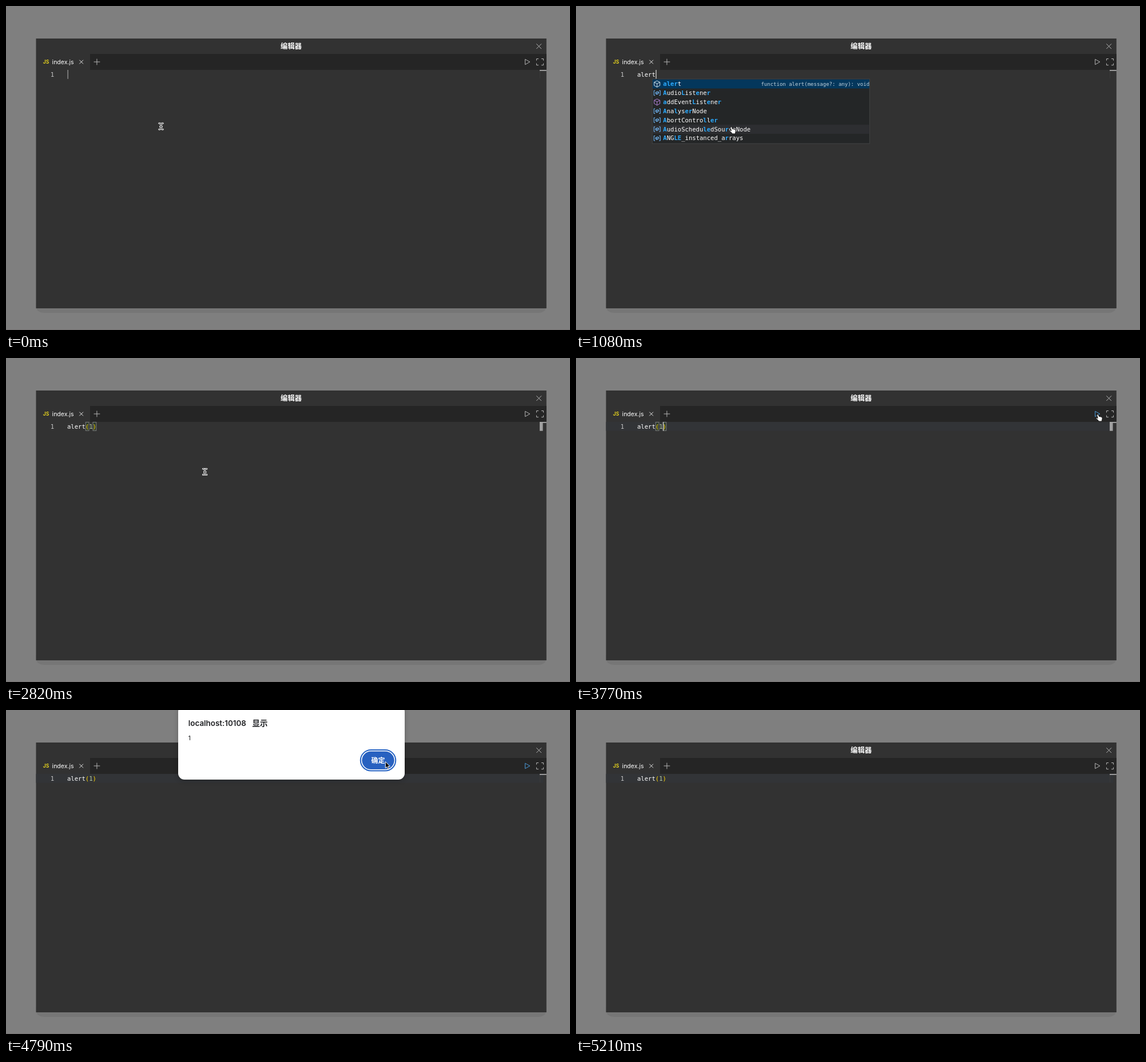
An HTML page that plays this animation: 986 by 568 pixels, repeating every 6.02 s.

```html
<!DOCTYPE html>
<html lang="zh">
<head>
<meta charset="utf-8">
<title>编辑器</title>
<style>
  html, body { margin: 0; width: 100%; height: 100%; overflow: hidden; background: #7f7f7f; }
  svg { position: absolute; left: 0; top: 0; display: block; }
  text { font-family: Inter, "Noto Sans CJK SC", "Noto Sans CJK", sans-serif; }
  .mono { font-family: "DejaVu Sans Mono", monospace; font-size: 10.58px; white-space: pre; }
  .line { fill: none; stroke: #b4b4b4; stroke-width: 1; }
  #dialog {
    position: absolute; left: 301px; top: -8px; width: 395.5px; height: 130px;
    border-radius: 11px; background: #fff; box-shadow: 0 2px 9px rgba(0, 0, 0, .24);
    transform-origin: 50% 100%;
  }
</style>
</head>
<body>
<svg width="986" height="568" viewBox="0 0 986 568">
  <defs>
    <g id="cube" fill="none" stroke-width="1">
      <path d="M6 .8 11 3.2V9L6 11.8 1 9V3.2ZM1 3.2 6 5.8 11 3.2M6 5.8V11.8"/>
    </g>
    <g id="variable" fill="none" stroke="#75beff" stroke-width="1">
      <path d="M2.6 2H.6V10.4H2.6M9.6 2H11.6V10.4H9.6M6.6 3.6 9 4.7V7L5.7 8.7 3.4 7.5V5.2ZM3.4 5.2 5.7 6.3 9 4.7M5.7 6.3V8.7"/>
    </g>
    <g id="braces" fill="none" stroke="#c5c5c5" stroke-width="1">
      <path d="M4 1.5Q2.3 1.5 2.3 3.2V4.6Q2.3 6.2 .8 6.2Q2.3 6.2 2.3 7.8V9.2Q2.3 10.9 4 10.9M8 1.5Q9.7 1.5 9.7 3.2V4.6Q9.7 6.2 11.2 6.2Q9.7 6.2 9.7 7.8V9.2Q9.7 10.9 8 10.9"/>
    </g>
  </defs>

  <rect y="567" width="986" height="1" fill="#777575"/>
  <path d="M52 520H945V524Q945 538 929 538H68Q52 538 52 524Z" fill="#767676"/>
  <rect x="52.5" y="57" width="892.3" height="473" fill="#323232"/>
  <rect x="147" y="84" width="797.8" height="28" fill="#252525"/>

  <text x="498.6" y="75.2" font-size="12.35" font-weight="600" fill="#fff" text-anchor="middle">编辑器</text>
  <path class="line" d="M927.3 66.3 936 75M936 66.3 927.3 75"/>
  <text x="64.7" y="101.3" font-size="8.6" font-weight="600" fill="#f1dd1c">JS</text>
  <text x="80.6" y="101.6" font-size="10.5" fill="#fff">index.js</text>
  <path class="line" d="M128.3 94.7 135 101.4M135 94.7 128.3 101.4" style="stroke:#e4e4e4"/>
  <path class="line" d="M153.5 98H164.3M158.9 92.6V103.4"/>
  <path id="play" class="line" d="M907.6 93.4 915.8 98 907.6 102.7Z"/>
  <path class="line" d="M927.5 95.7V92.5H931M936 92.5H939.5V95.7M939.5 100.5V103.7H936M931 103.7H927.5V100.5"/>

  <rect id="lineGlow" x="52.5" y="112" width="887" height="15.6" fill="#323437"/>
  <path d="M933.5 113V127" stroke="#3a3a3a"/>
  <rect id="rulerMark" x="933" y="112" width="5.5" height="15.8" fill="#a0a0a0"/>
  <rect x="933" y="112" width="11.8" height="1.8" fill="#a6a6a6"/>
  <text class="mono" x="77.8" y="123.6" fill="#c6c6c6">1</text>
  <g id="brackets"></g>
  <text id="code" class="mono" x="107" y="123.6" fill="#fff"></text>
  <rect id="caret" y="112" width="1.6" height="15.8" fill="#b4b4b2"/>
  <g id="lists"></g>
</svg>

<div id="dialog">
  <svg width="395.5" height="130" viewBox="301 -8 395.5 130">
    <g fill="#202124" font-weight="600" font-size="13.4">
      <text x="318.8" y="28">localhost:10108</text>
      <text x="430.5" y="28">显示</text>
    </g>
    <text x="318.5" y="53.4" font-size="11" fill="#202124">1</text>
    <rect x="619.8" y="70" width="61.4" height="36.6" rx="18.3" fill="none" stroke="#2361c3" stroke-width="2"/>
    <rect id="button" x="622.3" y="72.5" width="56.4" height="31.6" rx="15.8" fill="#2861c0"/>
    <text x="650.5" y="92.8" font-size="12" font-weight="600" fill="#fff" text-anchor="middle">确定</text>
  </svg>
</div>

<svg width="986" height="568" viewBox="0 0 986 568">
  <g id="mouse">
    <g id="ibeam" fill="none" stroke-linecap="round">
      <path id="ibeamPath" d="M-3.2-5.2Q-.3-5.2 0-3.8Q.3-5.2 3.2-5.2M0-3.8V3.8M-3.2 5.2Q-.3 5.2 0 3.8Q.3 5.2 3.2 5.2M-1.4.6H1.4" stroke="#fff" stroke-width="2.6"/>
      <use href="#ibeamPath"/>
      <path d="M-3.2-5.2Q-.3-5.2 0-3.8Q.3-5.2 3.2-5.2M0-3.8V3.8M-3.2 5.2Q-.3 5.2 0 3.8Q.3 5.2 3.2 5.2M-1.4.6H1.4" stroke="#222" stroke-width="1"/>
    </g>
    <path id="hand" fill="#fff" stroke="#111" stroke-width=".9" stroke-linejoin="round"
      d="M-.6 1.2Q.5.2 1.4 1.3L2.8 5 3.2 4.6Q4.4 4.1 5 5.2Q6 4.5 6.8 5.7Q8 5.4 8.2 6.8Q8.6 9 7.7 10.6L7.4 13H2.2Q1.6 11.4-.2 10L-2.6 8Q-2.9 6.6-1.5 6.8L.5 7.8-.9 2.5Q-1.1 1.7-.6 1.2Z"/>
    <path id="arrow" fill="#000" stroke="#fff" stroke-width="1" stroke-linejoin="round"
      d="M.7 0V11.4L3.3 9 5 13 6.9 12.2 5.2 8.3H8.8Z"/>
  </g>
</svg>

<script>
const LOOP = 6020, CHAR = 10.58 * 0.602, ROW = 15.88, CODE_X = 107;
const $ = id => document.getElementById(id);
const clamp = v => Math.max(0, Math.min(1, v));
const smooth = v => v * v * (3 - 2 * v);
const show = (el, on) => { el.style.display = on ? '' : 'none'; };
const within = (t, from, to) => t >= from && t < to;

// Value of the last step that has started.
const stepAt = (steps, t) => steps.filter(s => s[0] <= t).pop()[1];

const codeSteps = [[0, ''], [390, 'a'], [480, 'al'], [870, 'ale'], [900, 'aler'],
  [1080, 'alert'], [1710, 'alert()'], [2370, 'alert(1)']];
const listSteps = [[0, ''], [420, 'a'], [510, 'al'], [900, 'aler'], [1110, 'alert'], [1710, '']];
const caretSteps = [[0, .65], [60, .3], [120, 0], [390, 1], [2130, 0], [2370, 1],
  [2790, 0], [3150, 1], [3900, 0]];
const mouseSteps = [[0, 'ibeam'], [420, 'hand'], [1110, 'ibeam'], [3390, 'arrow'],
  [3420, 'hand'], [3960, 'arrow'], [5210, '']];
const mousePath = [[0, 271, 211], [2730, 271, 211], [3150, 908, 115], [3360, 908, 115],
  [3480, 911.8, 98], [4520, 911.8, 98], [4790, 662.6, 90.5], [5060, 662.6, 90.5],
  [5120, 673, 104], [5180, 873, 339], [LOOP, 873, 339]];

const common = ['alert', 'AudioListener', 'addEventListener', 'AnalyserNode', 'AudioWorklet',
  'AudioWorkletNode', 'AbortSignal', 'AnimationPlaybackEvent', 'AbortController',
  'AudioScheduledSourceNode', 'WebAssembly', 'AnimationTimeline'];
const suggestions = {
  a: common,
  al: common,
  aler: ['alert', 'AudioListener', 'addEventListener', 'AnalyserNode', 'AbortController',
    'AudioScheduledSourceNode', 'ANGLE_instanced_arrays'],
  alert: ['alert', 'SVGPathSegLinetoVerticalRel']
};

function markMatches(name, query) {
  let next = 0;
  return [...name].map(c => c.toLowerCase() === query[next]
    ? (next++, `<tspan fill="#2aaaff" font-weight="bold">${c}</tspan>`) : c).join('');
}

function icon(name) {
  if (name === 'alert') return ['cube', '#d8e6f0'];
  if (name === 'addEventListener') return ['cube', '#b180d7'];
  return [name === 'WebAssembly' ? 'braces' : 'variable', '#75beff'];
}

function listMarkup(query) {
  const names = suggestions[query], height = names.length * ROW + 2;
  const left = CODE_X + query.length * CHAR + .8, full = names.length === 12;
  const rowWidth = full ? 370 : 379;
  const rows = names.map((name, i) => {
    const [shape, color] = icon(name), y = .7 + i * ROW;
    const fill = i === 0 ? '#04375c' : i === 5 ? '#2d2e31' : 'none';
    return `<rect x=".5" y="${y}" width="${rowWidth}" height="${ROW}" fill="${fill}"/>
      <use href="#${shape}" x="2.4" y="${y + 1.7}" stroke="${color}"/>
      <text class="mono" x="19" y="${y + 11.4}" fill="#fff">${markMatches(name, query)}</text>`;
  }).join('');
  return `<g id="list-${query}" transform="translate(${left} 128)">
    <rect width="380" height="${height}" fill="#242627" stroke="#454647" stroke-width=".9"/>${rows}
    <text class="mono" x="${rowWidth + .8}" y="11.6" text-anchor="end" fill="#c3d2dd" style="font-size:9px">function alert(message?: any): void</text>
    ${full ? '<rect x="370.5" y=".6" width="9" height="129" fill="#515253"/>' : ''}</g>`;
}

function codeMarkup(code) {
  return code.replace(/[()]/g, '<tspan fill="#ffd700">$&</tspan>')
    .replace(/1/, '<tspan fill="#b5cea8">1</tspan>');
}

function bracketBoxes(code) {
  return [code.indexOf('('), code.indexOf(')')].map(col =>
    `<rect x="${CODE_X + .4 + col * CHAR}" y="112.5" width="5.8" height="14.8" fill="#2d3a2d" stroke="#858585" stroke-width=".9"/>`).join('');
}

function mouseAt(t) {
  const i = mousePath.findIndex(p => p[0] > t);
  const [t0, x0, y0] = mousePath[i - 1], [t1, x1, y1] = mousePath[i];
  const k = smooth((t - t0) / (t1 - t0));
  return [x0 + (x1 - x0) * k, y0 + (y1 - y0) * k];
}

function drawDialog(t) {
  const opening = t < 4910;
  const tilt = opening ? (1 - clamp((t - 3950) / 180)) ** 2 : smooth(clamp((t - 4940) / 180));
  const alpha = opening ? clamp((t - 3950) / 135) : 1 - clamp((t - 4950) / 150);
  const box = $('dialog');
  show(box, alpha > 0);
  box.style.opacity = alpha;
  box.style.transform = tilt
    ? `translateY(${-24 * tilt}px) perspective(400px) rotateX(${12 * tilt}deg)` : 'none';
  $('button').setAttribute('fill', within(t, 4910, 5120) ? '#2258b0' : '#2861c0');
}

let shownCode = null;
function drawCode(t) {
  const code = stepAt(codeSteps, t);
  if (code !== shownCode) {
    shownCode = code;
    $('code').innerHTML = codeMarkup(code);
    $('brackets').innerHTML = code.includes(')') ? bracketBoxes(code) : '';
  }
  const column = code.endsWith(')') ? code.length - 1 : code.length;
  $('caret').setAttribute('x', CODE_X + .4 + column * CHAR);
  $('caret').style.opacity = stepAt(caretSteps, t);
}

function draw(t) {
  drawCode(t);
  const matched = within(t, 1830, 3900);
  show($('brackets'), matched);
  show($('rulerMark'), matched);
  show($('lineGlow'), t >= 3660);
  $('play').style.stroke = within(t, 3420, 5060) ? '#4a9ad8' : '#b4b4b4';

  const query = stepAt(listSteps, t);
  for (const key in suggestions) show($('list-' + key), key === query);

  drawDialog(t);

  const kind = stepAt(mouseSteps, t), [x, y] = mouseAt(t);
  for (const name of ['ibeam', 'hand', 'arrow']) show($(name), name === kind);
  $('mouse').setAttribute('transform', `translate(${x} ${y})`);
}

$('lists').innerHTML = Object.keys(suggestions).map(listMarkup).join('');
const start = performance.now();
function frame() {
  draw((performance.now() - start) % LOOP);
  requestAnimationFrame(frame);
}
frame();
</script>
</body>
</html>
```
